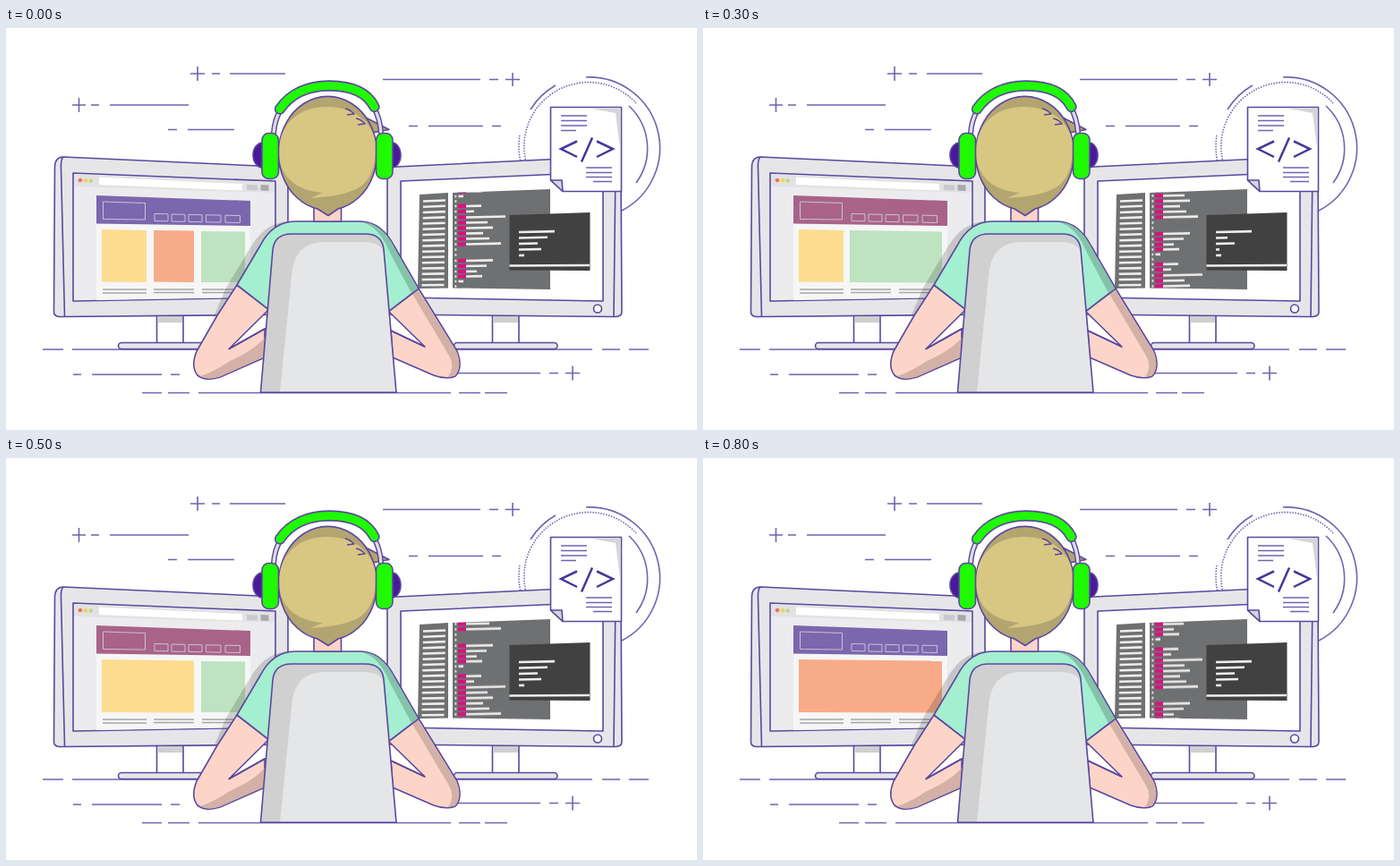
An HTML page that plays this animation: 772x449 px, repeating every 900 ms.

```html
<!DOCTYPE html>
<html lang="en">
<head>
<meta charset="utf-8">
<title>Coding at the desk</title>
<style>
  html, body { margin: 0; width: 100%; height: 100%; overflow: hidden; background: #fff; }
  svg { display: block; width: 772px; height: 449px; }
  .ink { stroke: #5b479f; stroke-width: 1.6; stroke-linejoin: round; }
  .line { fill: none; stroke: #7163b0; stroke-width: 1.6; }
  .case { fill: #e6e6e9; }
  .skin { fill: #fcd5c8; }
  .yellow { fill: #fddc8f; }
  .orange { fill: #f8ab88; }
  .green { fill: #bfe2c0; }
  .neon { fill: #1ffa00; }
  .text { fill: none; stroke: #eee; stroke-width: 2.6; }

  .loop, .loop > * { animation: 900ms step-end -1ms infinite; }
  #scroll { animation: scroll 900ms steps(9) -1ms infinite; }
  #banner { animation-name: banner; }
  #cards > * { visibility: hidden; }
  #cards > :nth-child(1) { animation-name: page1; }
  #cards > :nth-child(2) { animation-name: page2; }
  #cards > :nth-child(3) { animation-name: page3; }
  #cards > :nth-child(4) { animation-name: page4; }
  #output > * { visibility: hidden; }
  #output > :nth-child(1) { animation-name: output1; }
  #output > :nth-child(2) { animation-name: output2; }
  #output > :nth-child(3) { animation-name: output3; }

  @keyframes scroll { to { transform: translateY(-90.5px); } }
  @keyframes banner { 0%, 77.778% { fill: #7b67ad; } 33.333% { fill: #a96388; } }
  @keyframes page1 { 0% { visibility: visible; } 33.333%, to { visibility: hidden; } }
  @keyframes page2 { 0%, 55.556%, to { visibility: hidden; } 33.333% { visibility: visible; } }
  @keyframes page3 { 0%, 77.778%, to { visibility: hidden; } 55.556% { visibility: visible; } }
  @keyframes page4 { 0% { visibility: hidden; } 77.778%, to { visibility: visible; } }
  @keyframes output1 { 0%, 44.444%, 88.889%, to { visibility: visible; } 22.222%, 66.667% { visibility: hidden; } }
  @keyframes output2 { 0%, 44.444%, to { visibility: hidden; } 22.222% { visibility: visible; } }
  @keyframes output3 { 0%, 88.889%, to { visibility: hidden; } 66.667% { visibility: visible; } }
</style>
</head>
<body>
<svg viewBox="0 0 772 449">
  <defs>
    <clipPath id="editor"><path d="M499 184L608 180V292L499 290.5Z"/></clipPath>
  </defs>

  <!-- Backdrop -->
  <path class="line" d="M206 51h16M214 43v16M230 51h9M250 51h62M421 57.5h109M540 57.5h10M558 57.5h16M566 50v15
    M74 86h15M81.5 78v16M95 86h9M116 86h88M181 113.5h10M203 113.5h52M450 109.5h10M472 109.5h61M543 109.5h10
    M41 359h23M74 359h46M120 359h100M500 359h155M666 359h20M696 359h22M75 387h9M96 387h78M184 387h10
    M503 385.5h94M607 385.5h10M625 385.5h16M633 377.5v16M152 407.5h22M181 407.5h24M215 407.5h282M506 407.5h24M535 407.5h25"/>
  <path class="line" d="M648 55A79 79 0 0 1 688 204M586 91A79 79 0 0 1 614 64M696 87A65 65 0 0 1 704 173"/>
  <path class="line" stroke-dasharray="1.5 1.5" d="M581 150A72 72 0 0 1 704 84M576 154A79 79 0 0 1 574 120"/>

  <!-- Left monitor -->
  <g class="ink">
    <path fill="#fff" d="M168.500 320h29.500v32h-29.500z"/>
    <rect x="125.500" y="351.500" width="100" height="7" rx="3.500" fill="#e6e6e9"/>
    <path class="case" d="M64 144L315 155.500V320L60 322.500Q53.500 322 53.500 317L54.500 155Q55 144 64 144Z"/>
    <path fill="none" d="M64 144Q61 147 61.500 156L65.500 322"/>
    <path fill="#ececee" d="M75 162L301 171V301L75 305Z"/>
  </g>
  <path fill="#cfcfd1" d="M170 322h27v7h-27z"/>
  <path fill="#e2e2e4" d="M76 163.500L300 172.500V184L76 177Z"/>
  <path fill="#f6f6f7" d="M101 187L273 193V301L101 304Z"/>
  <path fill="#fff" d="M104 166.500L264 174V181.500L104 175Z"/>
  <path fill="#c9c9cb" d="M269 175l12 .5v6l-12-.5z"/>
  <path fill="#a9a9ab" d="M284.500 175l9 .5v6.500l-9-.5z"/>
  <circle cx="83" cy="170" r="2.300" fill="#f2705a"/>
  <circle cx="89" cy="170.200" r="2.300" fill="#f6cf55"/>
  <circle cx="94.800" cy="170.500" r="2.300" fill="#bcd98a"/>
  <g class="loop"><path id="banner" d="M101 187L273 193V221L101 218.500Z"/></g>
  <path fill="none" stroke="#cbc0dd" d="M108.500 194l47 1.500v18.500l-47-.5zM166 207.500l15 .3v8l-15-.3zM185 208l15 .3v8l-15-.3z
    M204 208.400l15 .3v8l-15-.3zM223.500 208.800l16.500 .3v8l-16.500-.3zM245 209.200l16.500 .3v8l-16.500-.3z"/>
  <g id="cards" class="loop">
    <g>
      <path class="yellow" d="M107 225L157 226V284L107 283.500Z"/>
      <path class="orange" d="M165 226L210 226.500V284L165 283.500Z"/>
      <path class="green" d="M218 227L267 227.500V284H218Z"/>
    </g>
    <g>
      <path class="yellow" d="M107 225L157 226V284L107 283.500Z"/>
      <path class="green" d="M164 226L267 227.500V284.500L164 284Z"/>
    </g>
    <g>
      <path class="yellow" d="M107 225L210 226.500V284.500L107 284Z"/>
      <path class="green" d="M218 227L267 227.500V284H218Z"/>
    </g>
    <g><path class="orange" d="M107 225L267 226.500V284.500L107 284Z"/></g>
  </g>
  <path fill="none" stroke="#a6a6a8" stroke-width="1.500" d="M108 292h49M108 296h49M165 292h45M165 295.500h45M219 292h42M219 295.500h38"/>

  <!-- Right monitor -->
  <g class="ink">
    <path fill="#fff" d="M543.500 320h29.500v32h-29.500z"/>
    <rect x="500.500" y="351.500" width="115.500" height="7" rx="3.500" fill="#e6e6e9"/>
    <path class="case" d="M426 155.500L676 143.500Q687 144 687 155L688 317Q688 322 681 322.500L426 320Z"/>
    <path fill="none" d="M677 144Q681 147 681 157L679 322"/>
    <path fill="#fff" d="M441 171L667 161V305L441 301Z"/>
    <circle cx="661" cy="313.500" r="4.500" fill="#fff"/>
  </g>
  <path fill="#cfcfd1" d="M545 322h27v7h-27z"/>
  <path fill="#6f7072" d="M462 186L494 184V290.500L460 291ZM499 184L608 180V292L499 290.500Z"/>
  <path id="sidebar" class="text"/>
  <g clip-path="url(#editor)">
    <g id="scroll">
      <path id="keywords" fill="none" stroke="#d8127f" stroke-width="4.200"/>
      <path id="code" class="text"/>
    </g>
  </g>
  <path fill="#414142" d="M562.500 209L652.500 206V271L562.500 270.500Z"/>
  <path class="text" d="M562.500 265.500L652 265"/>
  <g id="output" class="loop"></g>

  <!-- Document -->
  <path class="ink" fill="#fff" d="M608.500 88.500H687.500V182.500H622L608.500 170Z"/>
  <path fill="#d5d5d8" d="M652 89.500H686.500V138L681 95Z"/>
  <path class="ink" fill="#d5d5d8" d="M608.500 170H621L622 182.500Z"/>
  <path class="line" d="M620 98h29M620 103.500h29M620 109h29M620 114.500h17M648 156h29M648 161.500h29M648 166.500h29M656 171.500h21"/>
  <path fill="none" stroke="#4a3698" stroke-width="2.500" d="M638 126.500L620 135L638 144M655 122.500L643 149.500M660 126.500L678 135L660 144"/>

  <!-- Body -->
  <path opacity=".16" d="M314 216Q290 218 275 242L246 290L233 320H250L305 240Z"/>
  <g class="ink">
    <path class="skin" d="M258 287L236 321L213 361Q206 378 214 388Q223 395 239 390L289 368V336L249 358.500L294 314Z"/>
    <path class="skin" d="M461 291L504 361Q511 379 502 389Q492 393 478 388L432 368L430 338L468 356L427 316Z"/>
  </g>
  <path fill="#d3b1a6" d="M289 346Q277 360 250 372Q232 384 217 389Q225 394 239 389.500L288 367.500Z"/>
  <path fill="#d3b1a6" d="M460 292L503.500 362Q510 378 501.500 388.500L494 390Q502 378 495 366L454 297Z"/>
  <path fill="none" class="ink" d="M249 358.500L290 335.500M430 338L468 356"/>
  <path class="ink" fill="#a3efd0" d="M258 287L284 243Q298 216 323 216H397Q420 217 434 244L461 291L427 317L400 270H318L294 315Z"/>
  <path fill="#84c2a9" d="M398 217Q420 218 433 244L460 291L453 296L429 251Q417 222 398 217Z"/>
  <path fill="#d0d0d1" d="M284.500 407L298 248Q300 230 319 230H401Q420 230 422 247L436 407Z"/>
  <path fill="#e5e6e8" d="M306 407L319 278Q321 239 356 239H402Q420 240 422 252L435.500 407Z"/>
  <path fill="none" class="ink" d="M284.500 407L298 248Q300 230 319 230H401Q420 230 422 247L436 407Z"/>

  <!-- Head and headphones -->
  <path class="ink skin" d="M344 190H374.500V216H344Z"/>
  <g class="ink" fill="#4c189b">
    <ellipse cx="287" cy="142" rx="11" ry="14"/>
    <ellipse cx="431" cy="142" rx="10" ry="14"/>
  </g>
  <path class="ink" fill="#b3a570" d="M400 99L428 113.500L409 117Z"/>
  <path class="ink" fill="#b3a570" d="M348 202A55 63.500 0 1 1 371 202L360 209.500Z"/>
  <path fill="#d8c783" d="M305 139C305 108 326 89 356 88C387 87 410 104 413 129C414 152 408 172 391 180C375 187 357 189 340 190L354 184C324 182 305 165 305 139Z"/>
  <path class="ink" fill="none" d="M379 90Q384 91 389 96L381 97M391 101Q397 102 401 107L393 108"/>
  <g fill="none" stroke-linecap="round">
    <path stroke="#5b479f" stroke-width="6.200" d="M299 118Q300 103 306 93M419 118Q418 101 411 89"/>
    <path stroke="#dedee2" stroke-width="3.300" d="M299 118Q300 103 306 93M419 118Q418 101 411 89"/>
    <path stroke="#5b479f" stroke-width="12.300" d="M306 90.500C318 73 338 64.500 361 64.500C384 64.500 403 71 411.500 88"/>
    <path stroke="#1ffa00" stroke-width="9.200" d="M306 90.500C318 73 338 64.500 361 64.500C384 64.500 403 71 411.500 88"/>
  </g>
  <g class="ink neon">
    <rect x="286" y="117.500" width="18.500" height="51" rx="7.500"/>
    <rect x="413.500" y="117.500" width="18.500" height="51" rx="7.500"/>
  </g>
</svg>
<script>
  const setPath = (id, d) => document.getElementById(id).setAttribute('d', d);
  const bar = (x, y, width, tilt = 0.022) => `M${x} ${y}l${width} ${-width * tilt}`;

  setPath('sidebar', Array.from({ length: 16 }, (_, i) => bar(466 - i / 10, 193.5 + i * 6.25, 25, 0.04 - i * 0.002)).join(''));

  // Offset from the top of the block and right end; a missing end is an empty line.
  const codeLines = [
    [0, 544], [6, 537], [12, 526], [17.5, 532], [23, 511], [28.5],
    [34, 531], [40, 523], [46.5, 558], [52.5, 538], [58.5, 544],
    [64.5, 533], [70.5, 540], [76.5, 553], [82.5], [88.5]
  ];
  const blockHeight = 95;
  let code = '', keywords = '';
  for (let block = 0; block < 3; block++) {
    for (const [offset, end] of codeLines) {
      const y = 165 + block * blockHeight + offset;
      code += bar(501.5, y, 1.8);
      if (!end) continue;
      const isBrace = end < 515;
      const start = isBrace ? 505.5 : 514;
      code += bar(start, y, end - start);
      if (!isBrace) keywords += bar(505, y, 9);
    }
  }
  setPath('code', code);
  setPath('keywords', keywords);

  const outputs = [[40, 32, 21, 25, 6], [40, 13, 21, 4, 6], [13, 31, 4, 25, 6]];
  document.getElementById('output').innerHTML = outputs.map(widths =>
    `<path class="text" d="${widths.map((w, i) => bar(573, 228 + i * 6.5, w)).join('')}"/>`).join('');
</script>
</body>
</html>
```
